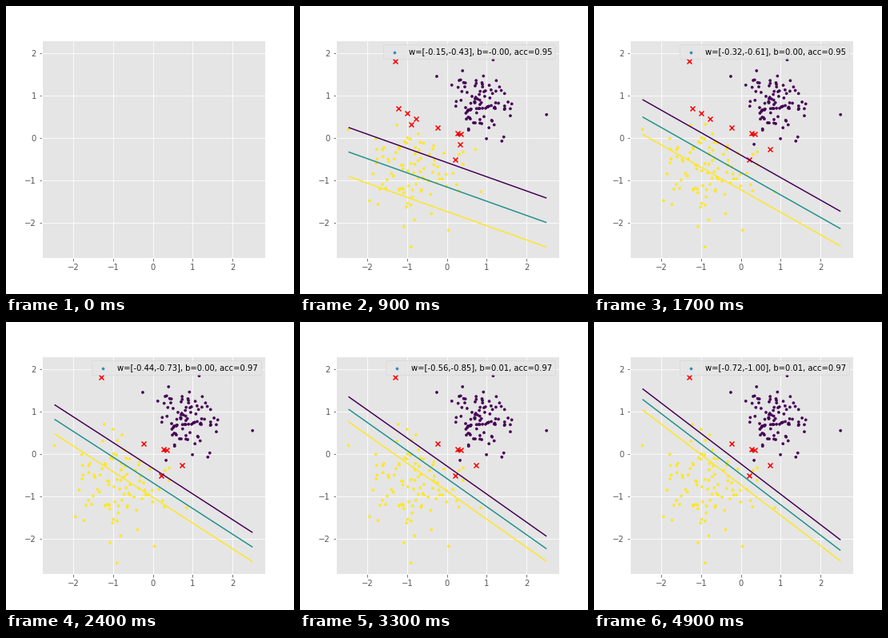
Recreate the animation shown at these times as a matplotlib script. Size 360 by 360 pixels, loop 5000 ms.

```python
import numpy as np
import matplotlib.pyplot as plt
from matplotlib.animation import FuncAnimation

plt.style.use("ggplot")
plt.rcParams["font.family"] = "DejaVu Sans"

FRAMES, INTERVAL = 50, 100
PER_CLASS = 100
PURPLE, TEAL, YELLOW = "#440154", "#21918c", "#fde725"

# Points on the wrong side of the boundary, then the outermost points.
UPPER_KEY = [(.33, -.15), (.21, -.51), (2.5, .55), (1.16, 1.84)]
LOWER_KEY = [(-1.3, 1.8), (-1.22, .7), (-1, .58), (-.89, .32), (-.78, .45),
             (-.23, .25), (.27, .11), (.35, .1), (.72, -.27),
             (-2.47, .2), (-.9, -2.57), (.85, -1.27)]


def model(step):
    """Weights and bias after `step` updates; growth is logarithmic."""
    w0 = -.5 * np.log(.0721 * step + .688)
    return w0, w0 - .289 + .0001 * step, .0004 * step - .005


def score(xy, step):
    w0, w1, b = model(step)
    return xy @ (w0, w1) + b


def make_cloud(rng, key_points, center, spread, side, low, high):
    """Complete a class with normal samples lying safely on its own side."""
    xy = rng.normal(center, spread, (800, 2))
    inside = np.all((xy > low) & (xy < high), axis=1)
    separable = (side * score(xy, 9) > .02) & (side * score(xy, 49) > .02)
    return np.vstack([key_points, xy[inside & separable][:PER_CLASS - len(key_points)]])


rng = np.random.default_rng(4)
upper = make_cloud(rng, UPPER_KEY, (.83, .75), (.37, .45), -1, (-.26, -.15), (1.65, 1.72))
lower = make_cloud(rng, LOWER_KEY, (-.85, -.75), (.62, .68), 1, (-2.4, -2.4), (.6, .6))
points = np.vstack([upper, lower])
is_lower = np.repeat([False, True], PER_CLASS)
colors = np.where(is_lower, YELLOW, PURPLE)
grid = np.stack(np.meshgrid(*zip(points.min(axis=0), points.max(axis=0))), axis=-1)

fig, ax = plt.subplots(figsize=(5, 5), dpi=72)
fig.subplots_adjust(left=.125, right=.9, bottom=.125, top=.88)


def draw(step):
    ax.clear()
    if step:
        w0, w1, b = model(step)
        wrong = (score(points, step) > 0) != is_lower
        label = f"w=[{w0:.2f},{w1:.2f}], b={b:.2f}, acc={1 - wrong.mean():.2f}"
        ax.scatter(*points[~wrong].T, s=10, c=colors[~wrong])
        ax.scatter(*points[wrong].T, s=36, c="red", marker="x")
        ax.contour(grid[..., 0], grid[..., 1], score(grid, step),
                   levels=[.25, .5, .75], colors=[PURPLE, TEAL, YELLOW],
                   linestyles="solid", linewidths=1.5)
        ax.scatter([], [], s=10, color="C1", label=label)
        ax.legend(loc="upper right")
    ax.set(xlim=(-2.783, 2.817), ylim=(-2.83, 2.295),
           xticks=range(-2, 3), yticks=range(-2, 3))


animation = FuncAnimation(fig, draw, frames=FRAMES, interval=INTERVAL,
                          repeat=True, repeat_delay=0)
plt.show()
```
